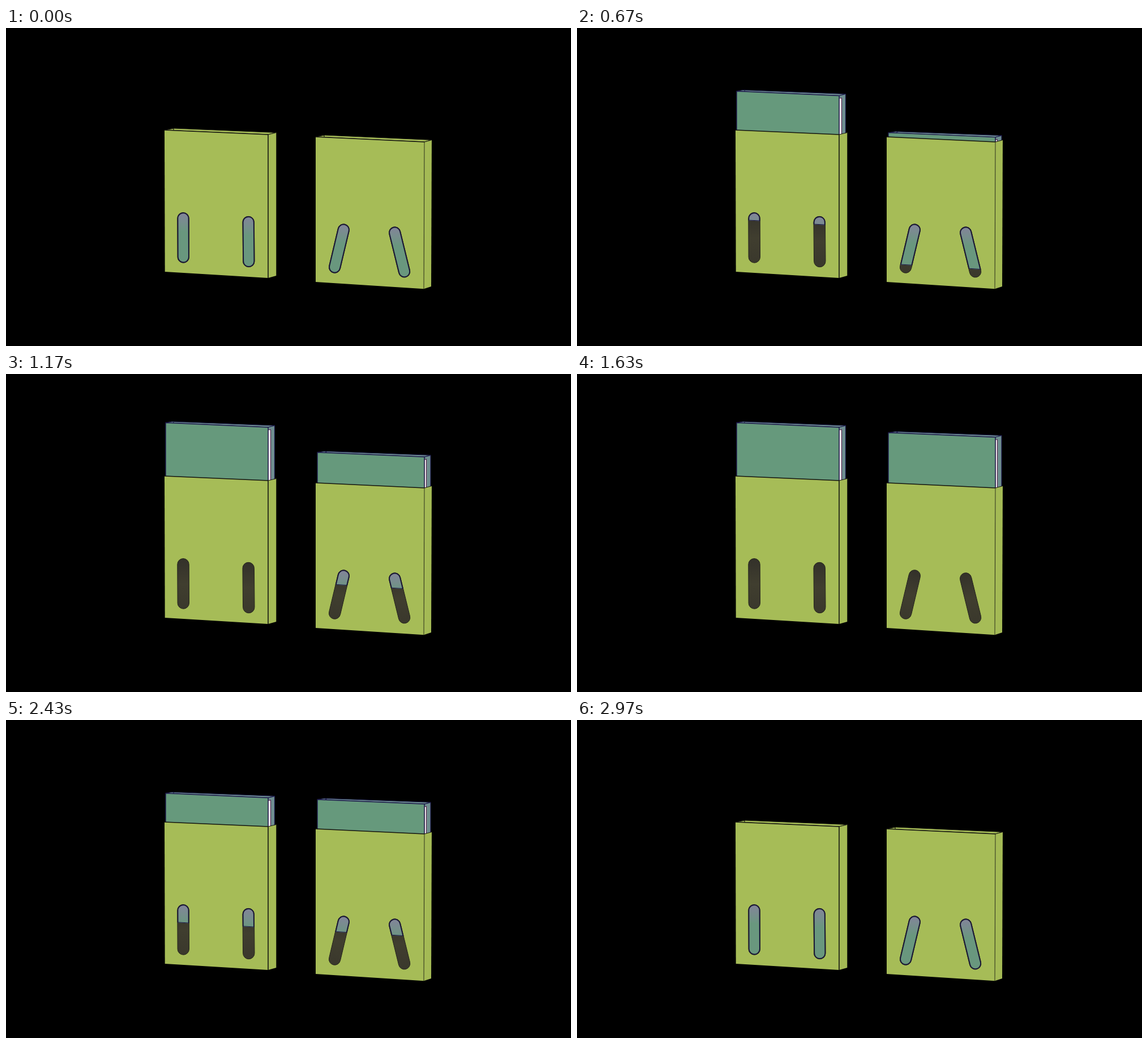
These frames come from a looping animation (998 by 561 pixels, 3.03 s). An HTML page with a canvas:

```html
<!DOCTYPE html>
<html>
<head>
<meta charset="utf-8">
<title>Sliding cards</title>
<style>
html, body { margin: 0; width: 100%; height: 100%; overflow: hidden; background: #000; }
canvas { display: block; }
</style>
</head>
<body>
<canvas id="stage" width="998" height="561"></canvas>
<script>
const ctx = document.getElementById('stage').getContext('2d');
const LOOP = 3030, FRAME = 100 / 3, TRAVEL = 110;
const GREEN = '#a6bc57', SIDE = '#a4ba55', TEAL = '#66997c', TEAL_SIDE = '#6f8f90';
const NAVY = '#1d1a4c', INK = '#14140f';

// Sleeves: corner points, card outline relative to its top-left height, slot axes
const sleeves = [
  {
    front: [[280, 180], [463, 188], [463, 441], [280.7, 430]],
    back: [[297, 177], [477.3, 184.5], [477.3, 437]],
    card: [[282, 0], [463, 8], [474.5, 5], [293, -2]],
    slots: [[313, 335.8, 313.3, 404], [428.2, 342.5, 428.8, 411.5]],
    open: 86, rise: [0, 980], line: 1.6, paper: 4.5,
    bottom: x => 228.5 + .061 * (x - 313)
  },
  {
    front: [[547, 192], [739, 201], [738, 460.3], [547, 448]],
    back: [[563, 189], [752, 197.5], [751, 456]],
    card: [[550, 0], [739, 8], [750, 5], [563, -2]],
    slots: [[596.3, 356, 580.6, 422], [686.7, 361, 703.6, 429.7]],
    open: 97, rise: [140, 1770], line: .8, paper: 3.5,
    bottom: x => 233.4 + .061 * (x - 582)
  }
];

function ease(t, start, span) {
  const s = Math.min(1, Math.max(0, (t - start) / span));
  return (1 - Math.cos(Math.PI * s)) / 2;
}

function line(points, color, width) {
  ctx.beginPath();
  points.forEach(p => ctx.lineTo(...p));
  ctx.strokeStyle = color;
  ctx.lineWidth = width;
  ctx.stroke();
}

function shape(points, fill, stroke, width) {
  ctx.beginPath();
  points.forEach(p => ctx.lineTo(...p));
  ctx.closePath();
  ctx.fillStyle = fill;
  ctx.fill();
  if (stroke) {
    ctx.strokeStyle = stroke;
    ctx.lineWidth = width;
    ctx.stroke();
  }
}

function drawCard(s, y) {
  const [a, b, c, d] = s.card.map(([x, dy]) => [x, y + dy]);
  const down = ([x, py]) => [x, py + 150];
  const edge = b[0] + s.paper;
  shape([a, b, c, d], TEAL_SIDE, NAVY, 1);
  line([[a[0] + 13, a[1]], [d[0] + 4, d[1] + .5]], NAVY, 1);
  shape([b, c, down(c), down(b)], TEAL_SIDE, NAVY, 1.2);
  shape([[b[0], b[1] + 4.5], [edge, b[1] + 4], [edge, b[1] + 150], [b[0], b[1] + 150]],
    '#f5f0f4', '#54264c', 1.2);
  shape([a, b, down(b), down(a)], TEAL, NAVY, 1.4);
}

function pill([x1, y1, x2, y2], r) {
  const turn = Math.atan2(y2 - y1, x2 - x1) + Math.PI / 2;
  ctx.beginPath();
  ctx.arc(x1, y1, r, turn, turn + Math.PI);
  ctx.arc(x2, y2, r, turn - Math.PI, turn);
  ctx.closePath();
}

function gradient(x1, y1, x2, y2, ...colors) {
  const g = ctx.createLinearGradient(x1, y1, x2, y2);
  colors.forEach((c, i) => g.addColorStop(i / (colors.length - 1), c));
  return g;
}

function drawSlot(s, slot, y) {
  const [x1, y1, x2, y2] = slot;
  const bottomAt = x => y + s.bottom(x);
  pill(slot, 10.2);
  ctx.fillStyle = gradient(x1, y1 - 10, x2, y2 + 10, '#33312a', '#403e2f', '#3a382c');
  ctx.fill();
  ctx.strokeStyle = '#24231c';
  ctx.lineWidth = 1;
  ctx.stroke();

  // The part of the slot still covered by the card
  const left = Math.min(x1, x2) - 14, right = Math.max(x1, x2) + 14;
  ctx.save();
  ctx.beginPath();
  [[left, 0], [right, 0], [right, bottomAt(right)], [left, bottomAt(left)]]
    .forEach(p => ctx.lineTo(...p));
  ctx.clip();
  pill(slot, 9.6);
  ctx.fillStyle = gradient(0, y1 - 10, 0, y1 + 24, '#83849a', '#778e8d', '#69977e');
  ctx.fill();
  ctx.save();
  ctx.clip();
  line([[left, bottomAt(left)], [right, bottomAt(right)]], NAVY, 2);
  ctx.restore();
  pill(slot, 9.6);
  ctx.strokeStyle = '#1b1936';
  ctx.lineWidth = 2;
  ctx.stroke();
  ctx.restore();
}

function drawSleeve(s, t) {
  const [a, b, c, d] = s.front, [e, f, g] = s.back;
  const lift = ease(t, ...s.rise) - ease(t, 1980, 1050);
  const y = s.open + TRAVEL * (1 - lift);
  shape([a, b, f, e], GREEN, INK, 1);
  line([[e[0] - 1, e[1]], [e[0] - 1, e[1] + 4]], INK, 1.2);
  drawCard(s, y);
  shape([b, f, g, c], SIDE);
  shape([a, b, c, d], GREEN);
  line([a, b], INK, 1.4);
  line([b, f], INK, 1);
  line([b, c], INK, s.line);
  s.slots.forEach(slot => drawSlot(s, slot, y));
}

function draw(now) {
  const t = Math.floor((now % LOOP + 4) / FRAME) * FRAME;
  ctx.fillStyle = '#000';
  ctx.fillRect(0, 0, 998, 561);
  sleeves.forEach(s => drawSleeve(s, t));
}

ctx.lineJoin = 'round';
const begin = performance.now();
function tick() {
  draw(performance.now() - begin);
  requestAnimationFrame(tick);
}
tick();
</script>
</body>
</html>
```
